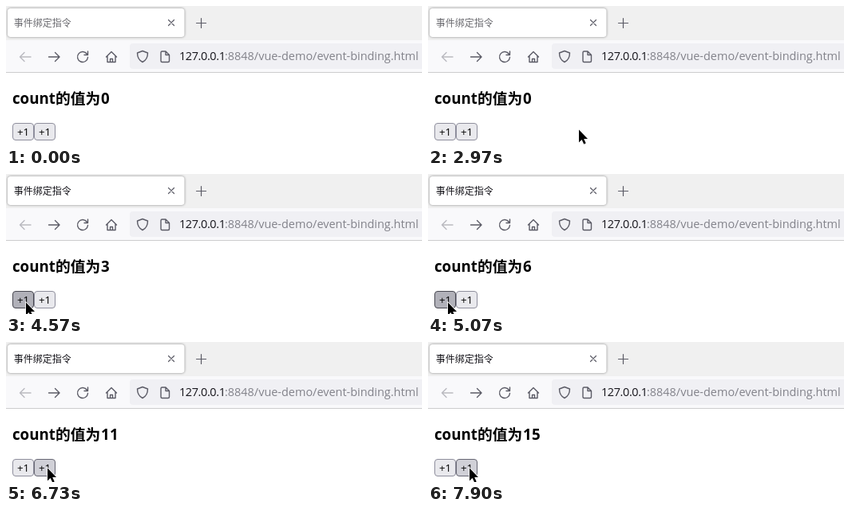
Animation, 521 px wide and 176 px high, one loop 8000 ms. Source, as an HTML page:

```html
<!DOCTYPE html>
<html lang="zh-CN">
<head>
<meta charset="utf-8">
<title>事件绑定指令</title>
<style>
  html, body { margin: 0; width: 100%; height: 100%; overflow: hidden; background: #fff; }
  svg { display: block; }
  text { font-family: "Open Sans", "Noto Sans CJK SC", "Noto Sans CJK", sans-serif; white-space: pre; }
  .icon { fill: none; stroke: #5b5b66; stroke-width: 1.4; stroke-linecap: round; stroke-linejoin: round; }
  .thin { stroke-width: 1.2; }
  .tab { filter: drop-shadow(0 0 1.5px rgba(0, 0, 0, .45)); }
  .url { font-size: 14.45px; }
  .heading { font-size: 18.72px; font-weight: 700; }
  .button rect { fill: #e9e9ed; stroke: #8f8f9d; }
  .button.hover rect { fill: #d0d0d7; stroke: #676774; }
  .button.active rect { fill: #b1b1b9; stroke: #484851; }
  .button text { font-size: 13.33px; }
  #pointer { stroke: #fff; stroke-width: 1.6; paint-order: stroke; }
</style>
</head>
<body>
<svg width="521" height="176" viewBox="0 0 521 176">
  <!-- tab strip -->
  <rect width="521" height="44" fill="#f0f0f0"/>
  <rect class="tab" x="2" y="3" width="221.5" height="36" rx="4" fill="#fff"/>
  <text id="title" x="9.7" y="25.5" font-size="12">事件绑定指令</text>
  <path class="icon thin" stroke="#2b2a33" d="M203.5 17.5l7 7m0-7l-7 7"/>
  <path class="icon thin" d="M238.5 21.5h12m-6-6v12"/>

  <!-- toolbar -->
  <rect y="43" width="521" height="40" fill="#f9f9fb"/>
  <rect y="83" width="521" height="1" fill="#ccccce"/>
  <rect x="155" y="47" width="380" height="32" rx="4" fill="#f0f0f4"/>
  <path class="icon" opacity=".4" d="M31 64H17.5m5.5-5.5L17.5 64l5.5 5.5"/>
  <path class="icon" d="M53.5 64H67m-5.5-5.5L67 64l-5.5 5.5"/>
  <path class="icon" d="M101.5 60.5a6.5 6.5 0 1 0 1 4M102.5 57v4.5H98"/>
  <path class="icon" d="M125.5 64l6.5-6.500 6.500 6.500M127 63v7.500h10V63M130.500 70.500v-4h3v4"/>
  <path class="icon" d="M171 56.5l6.500 2.500c0 5-1.500 9-6.500 11.500-5-2.500-6.500-6.500-6.500-11.500z"/>
  <path class="icon" d="M195.500 57h4.500l4.500 4.500v7.500q0 1.500-1.500 1.500h-7.500q-1.500 0-1.500-1.500v-10.500q0-1.500 1.500-1.500zm4.500.5v4h4"/>
  <text class="url" x="217" y="68" fill="#15141a" letter-spacing="-.39">127.0.0.1</text>
  <text class="url" x="274" y="68" fill="#82828a">:8848/vue-demo/event-binding.html</text>

  <!-- page -->
  <text class="heading" y="123"><tspan x="8">count</tspan><tspan x="62">的值为</tspan><tspan id="count" x="119" letter-spacing=".4">0</tspan></text>
  <g class="button" transform="translate(8 147)">
    <rect x=".5" y=".5" width="26" height="21" rx="3.5"/><text x="6" y="15.5">+1</text>
  </g>
  <g class="button" transform="translate(35 147)">
    <rect x=".5" y=".5" width="26" height="21" rx="3.5"/><text x="6" y="15.5">+1</text>
  </g>
  <path id="pointer" d="M1 1.500v16l3.600-3.400 2.700 5.600 2.400-1.100-2.500-5.500h4.800z"/>
</svg>
<script>
const LOOP = 8000, FOCUS = 3830, ENTER = 370, HOLD = 60;
const $ = id => document.getElementById(id);
const buttons = [...document.querySelectorAll('.button')];

// straight moves of the pointer, bent upwards by lift
const moves = [
  { from: ENTER, to: 500, x: 194, y: 154, lift: 0 },
  { from: 2945, to: 3630, x: 24, y: 160, lift: 25 },
  { from: 5930, to: 6330, x: 40, y: 162, lift: 0 },
  { from: 6430, to: 6530, x: 51, y: 157, lift: 0 }
];

// release times of n clicks whose gap grows by a fixed amount
const burst = (first, gap, n, grow = 0) =>
  Array.from({ length: n }, (_, k) => first + gap * k + grow * k * (k - 1) / 2);

const clicks = [
  ...burst(FOCUS, 170, 2), ...burst(4300, 330, 2), ...burst(4800, 157, 4),
  ...burst(5670, 130, 2), ...burst(6730, 200, 5, 60)
];

function tipAt(t) {
  if (t < ENTER) return [-99, -99];
  let x = 190, y = 171;
  for (const m of moves) {
    const k = Math.min(1, Math.max(0, (t - m.from) / (m.to - m.from)));
    x += (m.x - x) * k;
    y += (m.y - y) * k - m.lift * Math.sin(Math.PI * k) ** 2;
  }
  return [Math.round(x), Math.round(y)];
}

function draw(t) {
  const [x, y] = tipAt(t);
  const pressed = t >= FOCUS && clicks.some(up => t >= up - HOLD && t < up);

  $('pointer').setAttribute('transform', `translate(${x} ${y})`);
  $('title').setAttribute('fill', t < FOCUS ? '#6b6b70' : '#15141a');
  $('count').textContent = clicks.filter(up => t >= up).length;
  buttons.forEach((b, i) => {
    const left = 8 + 27 * i;
    const over = x >= left && x < left + 27 && y >= 147 && y < 169;
    b.classList.toggle('hover', over);
    b.classList.toggle('active', over && pressed);
  });
}

const start = performance.now();
function tick() {
  draw((performance.now() - start) % LOOP);
  requestAnimationFrame(tick);
}
tick();
</script>
</body>
</html>
```
